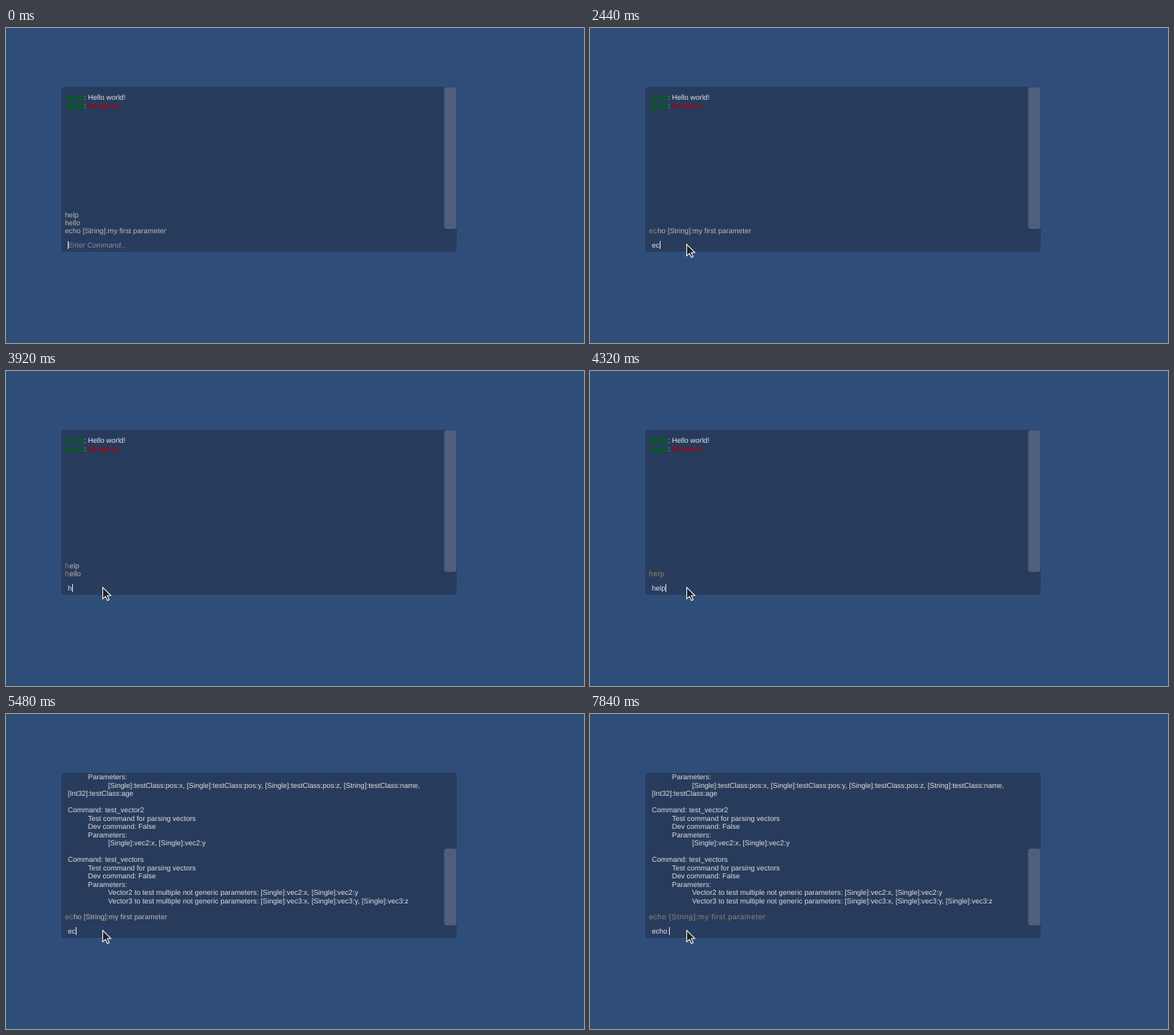
An HTML page with a canvas that plays this animation: 804x439 px, repeating every 8000 ms.

```html
<!DOCTYPE html>
<html lang="en">
<head>
<meta charset="utf-8">
<title>Command console</title>
<style>
  html, body { margin: 0; width: 100%; height: 100%; overflow: hidden; background: #2f4d79; }
  canvas { display: block; }
</style>
</head>
<body>
<canvas id="stage" width="804" height="439"></canvas>
<script>
const ctx = document.getElementById('stage').getContext('2d');
const LOOP = 8000;
const TAB = 28;
const SUBMIT_TIME = 4520;
const COMMANDS = ['help', 'hello', 'echo [String]:my first parameter'];

// [time, typed text, caret visible]
const INPUT = [
  [0, '', 1], [280, '', 0], [880, '', 1], [1480, '', 0], [2040, '', 1],
  [2120, 'e', 1], [2440, 'ec', 1], [2680, 'ech', 1], [3120, 'ec', 1],
  [3640, 'e', 1], [3760, '', 1], [3920, 'h', 1], [4120, 'he', 1],
  [4200, 'hel', 1], [4320, 'help', 1], [4520, '', 1], [4920, '', 0],
  [5320, 'e', 1], [5480, 'ec', 1], [6080, 'ec', 0], [6200, 'ech', 1],
  [6520, 'echo', 1], [7000, 'echo ', 1], [7520, 'echo ', 0], [7840, 'echo ', 1]
];

// [time, x, y] of the pointer tip
const POINTER = [[1320, 112, 372], [1400, 114, 351], [1480, 116, 330], [1520, 118, 315], [1640, 134, 300]];
const ARROW = new Path2D('M.5 1.5V17.6L4.3 14.2L7 19.8L9.5 18.7L7 13.1L11.8 12.8Z');

// [line, indent, text]
const HELP = [
  [0, 1, 'Parameters:'],
  [1, 2, '[Single]:testClass:pos:x, [Single]:testClass:pos:y, [Single]:testClass:pos:z, [String]:testClass:name,'],
  [2, 0, '[Int32]:testClass:age'],
  [4, 0, 'Command: test_vector2'],
  [5, 1, 'Test command for parsing vectors'],
  [6, 1, 'Dev command: False'],
  [7, 1, 'Parameters:'],
  [8, 2, '[Single]:vec2:x, [Single]:vec2:y'],
  [10, 0, 'Command: test_vectors'],
  [11, 1, 'Test command for parsing vectors'],
  [12, 1, 'Dev command: False'],
  [13, 1, 'Parameters:'],
  [14, 2, 'Vector2 to test multiple not generic parameters: [Single]:vec2:x, [Single]:vec2:y'],
  [15, 2, 'Vector3 to test multiple not generic parameters: [Single]:vec3:x, [Single]:vec3:y, [Single]:vec3:z']
];

const latest = (steps, t) => steps.filter(step => step[0] <= t).pop();

function box(x, y, w, h, color, radius = 4) {
  ctx.fillStyle = color;
  ctx.beginPath();
  ctx.roundRect(x, y, w, h, radius);
  ctx.fill();
}

// Draws text and returns the x where it ends.
function write(text, x, y, color, { size = 10, spacing = 0, style = '', weight = 0 } = {}) {
  ctx.font = `${style} ${size}px "Liberation Sans", Arial, sans-serif`;
  ctx.letterSpacing = spacing + 'px';
  ctx.fillStyle = ctx.strokeStyle = color;
  ctx.fillText(text, x, y);
  if (weight) {
    ctx.lineWidth = weight;
    ctx.strokeText(text, x, y);
  }
  return x + ctx.measureText(text).width;
}

function drawGreeting() {
  const white = '#e4e3e2';
  const green = { weight: 0.6 };
  write('guest', 84.3, 100, '#046018', green);
  write(': Hello world!', 108.4, 100, white);
  write('guest', 84.3, 112, '#046018', green);
  write(':', 108.4, 112, white);
  write("I'm red :o", 113.2, 112, '#a00812', { weight: 0.6, spacing: 0.15 });
}

function drawHelp() {
  for (const [line, indent, text] of HELP) {
    write(text, 86 + indent * TAB, Math.round(91 + line * 11.5), '#dedcda');
  }
}

function drawSuggestions(typed) {
  const matches = COMMANDS.filter(command => command.startsWith(typed));
  matches.forEach((command, i) => {
    const y = 286 - (matches.length - 1 - i) * 11;
    const split = typed.endsWith(' ') ? command.length : typed.length;
    const x = write(command.slice(0, split), 82, y, '#84796f', { size: 10.1, spacing: 0.67, weight: 0.2 });
    write(command.slice(split), x, y, '#c0b6ad', { size: 10.1 });
  });
}

function drawInput(typed, caret) {
  if (!typed) write('Enter Command...', 86, 306, '#838ea3', { size: 10.1, style: 'italic' });
  const end = write(typed, 86, 306, '#e4e6ea');
  if (caret) box(Math.round(end), 297, 1, 11, '#f2f3f5', 0);
}

function drawPointer(t) {
  const spot = latest(POINTER, t);
  if (!spot) return;
  ctx.save();
  ctx.translate(spot[1], spot[2]);
  ctx.fillStyle = '#202126';
  ctx.strokeStyle = '#fff';
  ctx.lineWidth = 1.1;
  ctx.fill(ARROW);
  ctx.stroke(ARROW);
  ctx.restore();
}

function draw(now) {
  const t = now % LOOP;
  const submitted = t >= SUBMIT_TIME;
  const [, typed, caret] = latest(INPUT, t);

  ctx.textRendering = 'geometricPrecision';
  box(0, 0, 804, 439, '#2f4d79', 0);
  box(77, 82, 550, 230, '#273c5d');
  box(77, 294, 550, 18, '#283c5e', [0, 0, 4, 4]);
  if (submitted) box(609.5, 187.5, 17, 107, '#4f5f7b');
  else box(609.5, 82.5, 17, 197.5, '#4f5f7b');

  if (submitted) drawHelp();
  else drawGreeting();
  drawSuggestions(typed);
  drawInput(typed, caret);
  drawPointer(t);
}

const start = performance.now();
function tick() {
  draw(performance.now() - start);
  requestAnimationFrame(tick);
}
tick();
</script>
</body>
</html>
```
